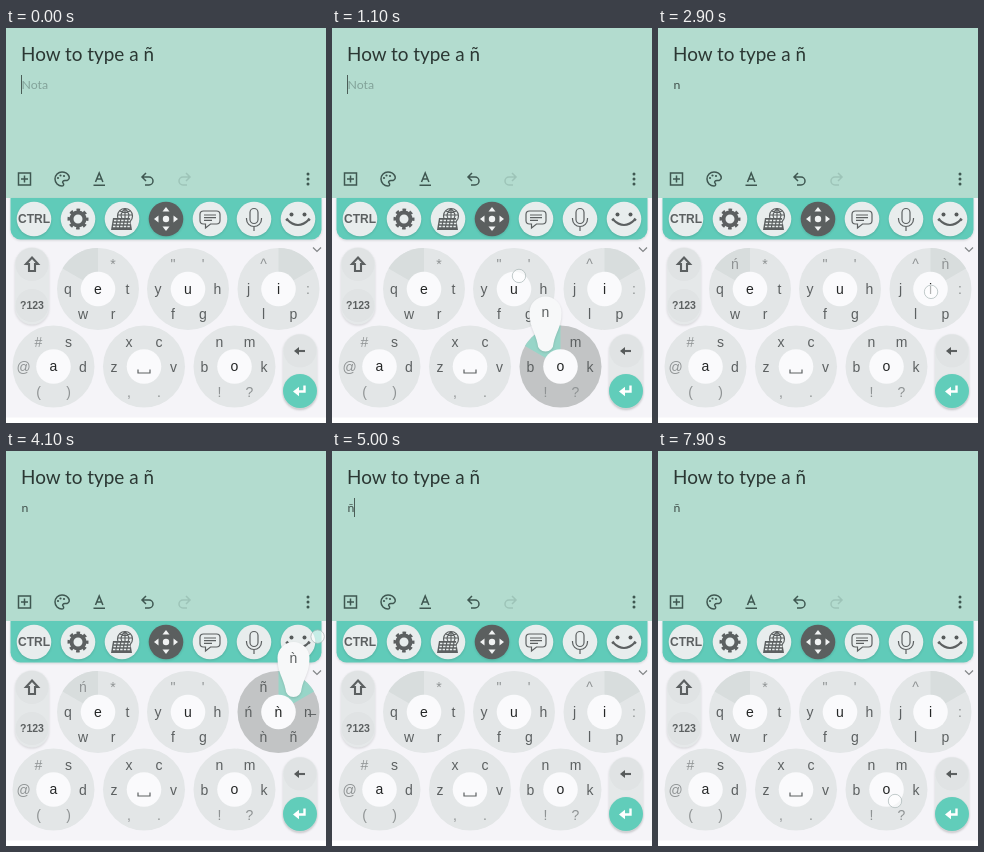
An HTML page that plays this animation: 320 by 395 pixels, repeating every 8 s.

```html
<!DOCTYPE html>
<html lang="en">
<head>
<meta charset="utf-8">
<style>
html, body { margin: 0; width: 100%; height: 100%; overflow: hidden; background: #fff }
svg { display: block; width: 100vw; height: 100vh }
text { font-family: "Liberation Sans", Arial, sans-serif; fill: #5c6061 }
.key text { text-anchor: middle; font-size: 14px }
.key .mid { fill: #242626 }
.line { fill: none; stroke: #3f5751; stroke-width: 1.5 }
.soft { filter: drop-shadow(0 1px 1px #0002) }
.dark { fill: #565a5a }
.stroke { fill: none; stroke: #5c6061; stroke-width: 1.7 }
.thin { stroke-width: 1.2 }
.bold { stroke-width: 2.1 }
</style>
</head>
<body>
<svg id="stage" viewBox="0 0 320 395">
  <rect width="320" height="170" fill="#b3dccf"/>
  <rect y="170" width="320" height="219.5" fill="#f5f4f8"/>
  <text x="15" y="33" style="font:18.9px Lato,sans-serif;fill:#2b3733">How to type a ñ</text>
  <text id="note" x="15.5" y="61" style="font:12.3px Lato,sans-serif"></text>
  <path id="caret" stroke="#4b5d57" d="M0 47v19"/>

  <g class="line">
    <path d="M12.500 145h12v12h-12zM18.500 147.500v7M15 151h7"/>
    <path d="M56 144a7 7 0 1 0 0 14c2 0 2-2 1-3s0-2.500 2-2.500h2c5-2 1-8.500-5-8.500z"/>
    <path d="M89.500 154l3.700-9 3.700 9M90.800 151h4.800M87.500 157.300h11.500"/>
    <path d="M140 145l-4 4 4 4M136.500 149h6.500a4 4 0 0 1 0 8h-4"/>
    <path opacity=".18" d="M180 145l4 4-4 4M183.500 149h-6.500a4 4 0 0 0 0 8h4"/>
  </g>
  <g fill="#3f5751">
    <circle cx="52" cy="150" r="1.100"/><circle cx="54.500" cy="147.500" r="1.100"/>
    <circle cx="58" cy="148" r="1.100"/>
    <circle cx="302" cy="146" r="1.500"/><circle cx="302" cy="151" r="1.500"/><circle cx="302" cy="156" r="1.500"/>
  </g>

  <path class="soft" fill="#60cbb9" d="M4.500 170h311v31.500a10 10 0 0 1-10 10H14.500a10 10 0 0 1-10-10z"/>
  <g id="bar"></g>
  <text x="28" y="195.300" text-anchor="middle" font-size="12" font-weight="600" textLength="">CTRL</text>
  <g class="stroke" transform="translate(72 191)">
    <circle r="6.500" stroke-width="1" style="stroke-width:4"/>
    <circle r="9" style="stroke-width:3" stroke-dasharray="3.534" stroke-dashoffset="1.767"/>
  </g>
  <g class="stroke thin" transform="translate(116 191)">
    <circle cx="3" cy="-3" r="7.500"/>
    <path d="M3-10.500v10M-4-4h14M-2-8q5 3 10 0M3-10.500q-6 6-3 10M3-10.500q6 6 3 10"/>
    <path d="M-9-1H8l2 12h-21z" fill="#5c6061" stroke="none"/>
    <path d="M-8 1.500H8M-8.500 4.500H8.500M-9 7.500H9" stroke="#e8eded" stroke-width="1.600" stroke-dasharray="2.400 1.200"/>
  </g>
  <g fill="#f1f3f3" transform="translate(160 191)">
    <circle r="3.200"/>
    <path id="tip" d="M0-12l3.500 4.500h-7z"/>
    <use href="#tip" transform="rotate(90)"/><use href="#tip" transform="rotate(180)"/><use href="#tip" transform="rotate(270)"/>
  </g>
  <path class="stroke thin" d="M197.500 183h13q3.500 0 3.500 3.500v6q0 3.500-3.500 3.500h-6l-5 4v-4h-2q-3.500 0-3.500-3.500v-6q0-3.500 3.500-3.500zM198 187h12M198 189.700h12M198 192.400h8"/>
  <path class="stroke thin" d="M244 184.500a4 4 0 0 1 8 0v7a4 4 0 0 1-8 0zM240.500 190v1a7.500 7.500 0 0 0 15 0v-1M248 198.500v4.500"/>
  <g class="dark"><circle cx="285.500" cy="186.500" r="2"/><circle cx="298.500" cy="186.500" r="2"/></g>
  <path class="stroke bold" d="M281 191.500q11 11 22 0M280 192.500l2-2M304 192.500l-2-2"/>

  <g class="soft" fill="#e5e8e9">
    <rect x="9" y="219.500" width="34" height="77" rx="17"/>
    <rect x="277" y="306" width="34" height="75" rx="17"/>
  </g>
  <g fill="#e0e3e4"><circle cx="26" cy="236.500" r="16.500"/><circle cx="26" cy="277.500" r="16.500"/><circle cx="294" cy="323" r="16.500"/></g>
  <path class="stroke bold" d="M26 229.500l6 6.500h-3v7h-6v-7h-3z"/>
  <text x="26" y="280.500" text-anchor="middle" font-size="10.500" font-weight="700">?123</text>
  <path class="stroke bold" d="M299 323h-8"/>
  <path class="dark" d="M288 323l5-4v8z"/>
  <circle class="soft" cx="294" cy="363" r="17" fill="#61cdba"/>
  <path d="M298.500 357.500v6h-7" fill="none" stroke="#fff" stroke-width="2.400"/>
  <path d="M287 363.500l6-4.700v9.400z" fill="#fff"/>
  <path class="stroke thin" d="M307 219.500l4 4 4-4" opacity=".75"/>

  <g id="wheels"></g>
  <g id="popup" class="key">
    <path class="soft" fill="#f7f8f9" d="M-16 0A16 16 0 0 1 16 0C16 15 10 20 8 31A8 8 0 0 1-8 31C-10 20-16 15-16 0z"/>
    <text y="4.500"></text>
  </g>
  <circle id="touch" r="6.700" fill="#fff" fill-opacity=".65" stroke="#a9b5b5" stroke-opacity=".7"/>
</svg>
<script>
const $ = id => document.getElementById(id);
const LOOP = 8000, TYPED = 1400, ACCENTED = 4950, VARIANTS = 3600;

function add(parent, tag, attrs, text = '') {
  const el = document.createElementNS('http://www.w3.org/2000/svg', tag);
  for (const k in attrs) el.setAttribute(k, attrs[k]);
  el.textContent = text;
  return parent.appendChild(el);
}

for (let i = 0; i < 7; i++)
  add($('bar'), 'circle', { class: 'soft', cx: 28 + 44 * i, cy: 191, r: 17.3, fill: i == 3 ? '#5b5f5f' : '#e8eded' });

// Slots run clockwise from the right.
const SLOTS = [[29.5, 0], [15, 25], [-15, 25], [-30, 0], [-15, -25], [15, -25]];
const polar = (r, deg) => [r * Math.cos(deg * Math.PI / 180), r * Math.sin(deg * Math.PI / 180)].map(v => v.toFixed(2));
const sector = i => `M${polar(41, i * 60 - 30)}A41 41 0 0 1 ${polar(41, i * 60 + 30)}L0 0z`;

function wheel(x, y, mid, chars, shaded = -1) {
  const g = add($('wheels'), 'g', { class: 'key', transform: `translate(${x} ${y})` });
  const disc = add(g, 'circle', { r: 41 });
  const shade = add(g, 'path', { d: shaded < 0 ? '' : sector(shaded), fill: '#d8dddd' });
  const pick = add(g, 'path', { fill: '#97d5c8' });
  add(g, 'circle', { r: 17.3, fill: '#fafafc' });
  const center = add(g, 'text', { class: 'mid', y: 4.5 });
  if (mid == ' ') add(g, 'path', { d: 'M-6 3v3.500H6V3', class: 'stroke thin' });
  const labels = SLOTS.map(([sx, sy]) => add(g, 'text', { x: sx, y: sy + 5 }));
  return { x, y, mid, chars, disc, shade, pick, center, labels };
}

const wheels = [
  wheel(92, 261, 'e', [...'trwq *'], 4),
  wheel(182, 261, 'u', [...`hgfy"'`]),
  wheel(272.5, 261, 'i', [...':plj^ '], 5),
  wheel(47.5, 338.5, 'a', [...'d)(@#s']),
  wheel(138, 338.5, ' ', [...'v.,zxc']),
  wheel(228.5, 338.5, 'o', [...'k?!bnm'])
];
const variants = ['n̶', 'ñ', 'ǹ', 'ń', 'ñ', 'ǹ'];

// Each stroke: wheel index, then [time, x, y] points.
const strokes = [
  [5, [850, 230, 342], [950, 222, 322], [1100, 187, 248], [1300, 183, 240]],
  [2, [2900, 273, 264], [3100, 282, 242], [3400, 309, 190], [4200, 312, 185], [4450, 276, 212], [4700, 248, 214], [ACCENTED, 244, 213]],
  [5, [7850, 237, 350], [LOOP, 237, 350]]
];

function touchAt(t) {
  for (const [index, ...pts] of strokes)
    for (let i = 1; i < pts.length; i++) {
      const [t0, x0, y0] = pts[i - 1], [t1, x1, y1] = pts[i];
      if (t < t0 || t >= t1) continue;
      const k = (t - t0) / (t1 - t0);
      return { index, x: x0 + (x1 - x0) * k, y: y0 + (y1 - y0) * k };
    }
}

function draw(t) {
  const touch = touchAt(t), typed = t >= TYPED, done = t >= ACCENTED;
  $('note').textContent = done ? 'ñ' : typed ? 'n' : 'Nota';
  $('note').style.fill = typed ? '#42524d' : '#82a299';
  const since = t - (done ? ACCENTED : typed ? TYPED : 0);
  $('caret').setAttribute('transform', `translate(${typed ? 22.5 : 15.5} 0)`);
  $('caret').style.display = since % 1000 < 500 ? '' : 'none';

  $('popup').style.display = 'none';
  wheels.forEach((w, i) => {
    const chars = [...w.chars];
    let mid = w.mid, slot = -1;
    if (typed && !done) {
      if (i == 0) chars[4] = 'ń';
      if (i == 2) chars[5] = 'ǹ';
    }
    const open = i == 2 && t >= VARIANTS && !done;
    if (open) {
      chars.splice(0, 6, ...variants);
      mid = 'ǹ';
    }
    if (touch && touch.index == i) {
      const dx = touch.x - w.x, dy = touch.y - w.y;
      if (Math.hypot(dx, dy) > 17) slot = (Math.round(Math.atan2(dy, dx) * 3 / Math.PI) + 6) % 6;
    }
    const active = slot >= 0;
    w.disc.setAttribute('fill', active ? '#c2c4c5' : '#e3e6e7');
    w.shade.style.display = active ? 'none' : '';
    w.pick.setAttribute('d', active ? sector(slot) : '');
    w.center.textContent = mid;
    w.labels.forEach((el, j) => {
      el.textContent = chars[j];
      el.style.fill = !open && /[^a-z]/.test(chars[j]) ? '#8f9394' : '';
    });
    if (active) {
      const [sx, sy] = SLOTS[slot];
      $('popup').style.display = '';
      $('popup').setAttribute('transform', `translate(${w.x + sx} ${w.y + sy - 29})`);
      $('popup').lastElementChild.textContent = chars[slot];
    }
  });

  $('touch').style.display = touch ? '' : 'none';
  if (touch) $('touch').setAttribute('transform', `translate(${touch.x} ${touch.y})`);
}

const start = performance.now();
function tick() {
  draw((performance.now() - start) % LOOP);
  requestAnimationFrame(tick);
}
tick();
</script>
</body>
</html>
```
